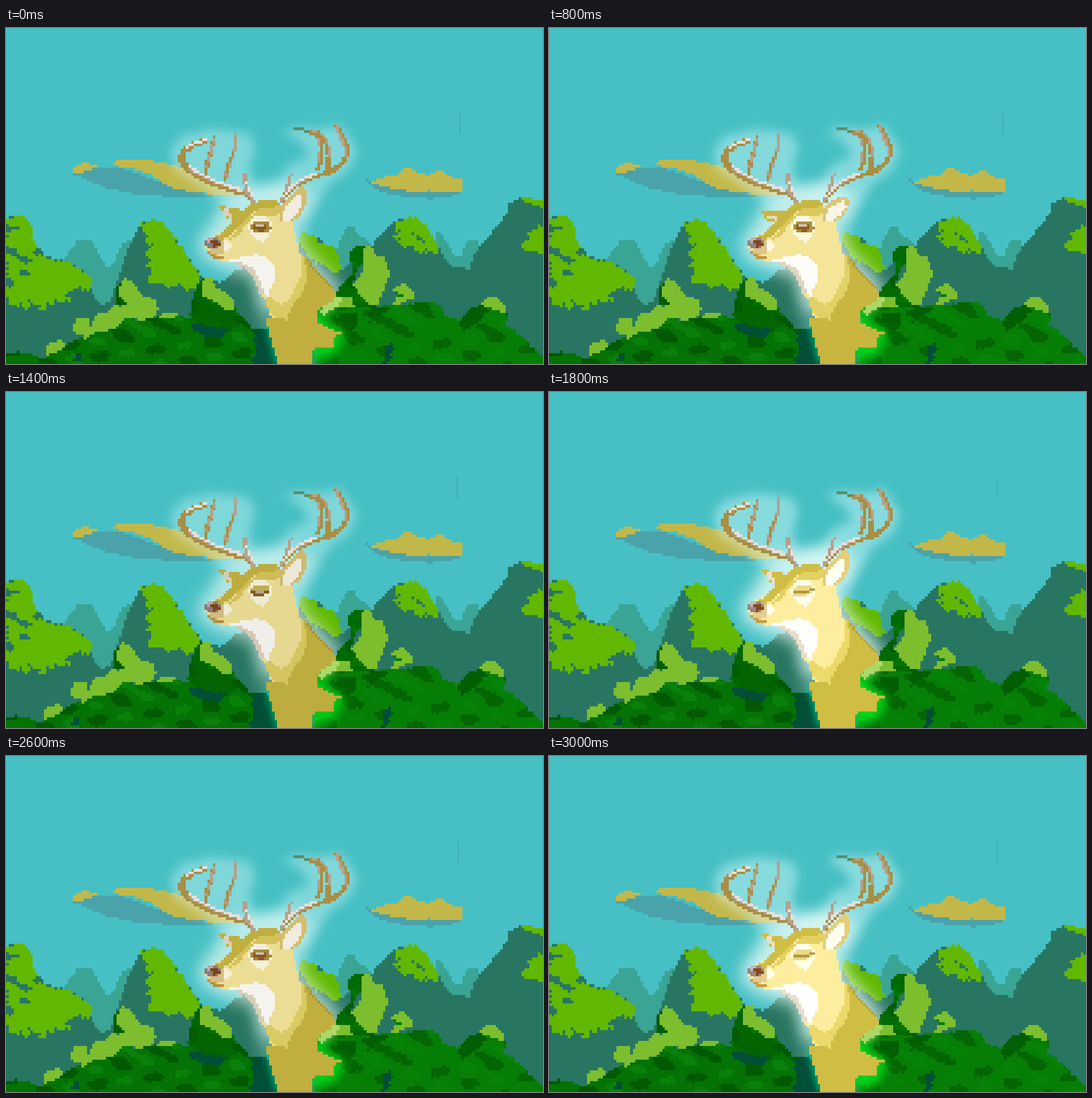
Animation of 947 by 592 pixels, one loop 3.2 s. Source, as an HTML page with a canvas:

```html
<!DOCTYPE html>
<html lang="en">
<head>
<meta charset="utf-8">
<title>Deer in the hills</title>
<style>
html, body { margin: 0; width: 100%; height: 100%; overflow: hidden; background: #46c0c4; }
canvas { display: block; }
</style>
</head>
<body>
<canvas id="stage" width="947" height="592"></canvas>
<script>
const W = 947, H = 592, CELL = 4.735;
const stage = document.getElementById('stage').getContext('2d');
const probe = document.createElement('canvas').getContext('2d');

function layer(draw) {
  const canvas = document.createElement('canvas');
  canvas.width = W + 13;
  canvas.height = H;
  draw(canvas.getContext('2d'));
  return canvas;
}

const parse = text => text.trim().split(/\s+/).map(p => p.split(',').map(Number));
const hash = (i, j) => {
  const v = Math.sin(i * 127.1 + j * 311.7) * 43758.5453;
  return v - Math.floor(v);
};

// Fills every grid cell whose centre passes the path test.
function cells(ctx, points, color, rough, pad, hit) {
  const xs = points.map(p => p[0]), ys = points.map(p => p[1]);
  const first = v => Math.floor((v - pad) / CELL), last = v => Math.ceil((v + pad) / CELL);
  for (let j = first(Math.min(...ys)); j <= last(Math.max(...ys)); j++) {
    for (let i = first(Math.min(...xs)); i <= last(Math.max(...xs)); i++) {
      const x = (i + .5) * CELL + (hash(i >> 1, j) - .5) * rough;
      const y = (j + .5) * CELL + (hash(i, j + 90) - .5) * rough;
      if (!hit(x, y)) continue;
      ctx.fillStyle = typeof color === 'function' ? color(x, y) : color;
      const left = Math.round(i * CELL), top = Math.round(j * CELL);
      ctx.fillRect(left, top, Math.round((i + 1) * CELL) - left, Math.round((j + 1) * CELL) - top);
    }
  }
}

function fill(ctx, color, text, rough = 0) {
  const points = parse(text), path = new Path2D('M' + points.join('L') + 'Z');
  cells(ctx, points, color, rough, rough, (x, y) => probe.isPointInPath(path, x, y));
}

function line(ctx, color, width, text) {
  const points = parse(text), path = new Path2D('M' + points.join('L'));
  probe.lineWidth = width;
  probe.lineJoin = 'round';
  cells(ctx, points, color, 0, width, (x, y) => probe.isPointInStroke(path, x, y));
}

function soft(ctx, color, blur, text) {
  ctx.filter = `blur(${blur}px)`;
  ctx.fillStyle = color;
  ctx.fill(new Path2D('M' + parse(text).join('L') + 'Z'));
  ctx.filter = 'none';
}

const GOLD = '#c0af3f', CREAM = '#eadc93', LEAF = '#7cbe2e', LIME = '#62b800', HILL = '#287662';
const DARK = '#025c02', FAR = '#3aa495', CLOUD = '#c2b84a', SHADE = '#4aa3aa', DEEP = '#004f36';

// Mottled foliage: diagonal dabs between three greens.
const foliage = (base, dark, light) => (x, y) => {
  const v = Math.sin(x / 13 + 2 * Math.sin(y / 15)) + Math.sin(y / 8 - x / 21);
  return v > .95 ? dark : v < -1.25 ? light : base;
};

const scenery = layer(c => {
  c.fillStyle = '#46c0c4';
  c.fillRect(0, 0, W + 13, H);
  fill(c, SHADE, '110,255 125,256 150,247 205,247 240,260 275,273 330,287 372,295 340,300 310,299 220,291 180,283 150,272 130,262');
  fill(c, CLOUD, '116,252 125,243 137,238 160,241 158,246 145,250 125,258');
  fill(c, CLOUD, '185,241 200,231 245,230 270,237 300,241 330,258 380,278 418,290 400,294 350,291 300,284 275,272 255,258 235,250 210,246');
  fill(c, SHADE, '635,265 650,272 670,278 700,286 805,288 800,294 750,301 710,299 670,291 645,280');
  fill(c, CLOUD, '643,272 660,264 690,260 700,248 712,245 722,252 735,256 745,262 758,251 770,250 778,262 800,264 806,272 803,289 765,290 745,286 720,289 690,284 665,279');
  fill(c, FAR, '100,412 118,385 128,373 150,373 160,388 168,408 181,424 192,410 203,382 225,372 240,500 120,500');
  fill(c, FAR, '583,390 597,360 603,352 613,352 622,364 640,374 660,420 580,430');
  fill(c, FAR, '755,355 770,365 782,385 790,403 802,405 810,382 822,372 835,378 840,430 770,430');
  fill(c, HILL, '0,335 20,330 35,345 50,380 70,402 110,412 140,430 150,462 165,488 185,482 200,435 215,388 238,345 255,338 275,345 300,375 320,403 340,430 350,445 380,448 408,426 440,415 510,420 520,365 550,370 582,400 590,430 605,415 645,385 658,365 690,338 715,333 737,345 755,372 775,408 787,423 818,424 828,395 850,368 885,325 888,308 908,300 960,308 960,592 0,592');
  fill(c, LIME, '0,333 10,335 15,329 30,333 42,350 55,385 50,402 70,405 110,412 120,425 140,430 150,442 148,462 122,458 105,468 112,480 90,483 75,488 65,503 57,490 42,482 35,498 25,488 8,487 0,465', 7);
  fill(c, HILL, '0,343 10,352 20,351 16,359 0,358', 5);
  fill(c, HILL, '0,380 15,388 28,402 48,408 34,415 20,405 0,394', 6);
  fill(c, HILL, '22,428 42,430 38,438 25,436', 5);
  fill(c, HILL, '0,440 15,447 8,458 0,455', 5);
  fill(c, LIME, '236,345 250,338 275,342 300,375 320,403 340,430 338,458 318,462 310,450 290,456 275,450 262,453 247,448 257,425 245,418 260,410 243,395 262,382 243,376 250,362 237,355', 7);
  fill(c, LIME, '515,372 520,360 545,367 550,378 578,383 585,400 590,425 580,435 565,425 560,415 545,415 540,405 525,390', 6);
  fill(c, LIME, '683,352 700,335 720,333 742,345 750,370 765,382 757,400 740,385 735,402 715,385 700,388 695,372 683,372 695,360', 7);
  fill(c, HILL, '715,360 730,365 740,378 728,374', 4);
  fill(c, LIME, '905,303 915,298 932,301 960,308 960,322 935,313');
  fill(c, LIME, '903,385 925,372 915,362 932,358 940,348 960,343 960,410 930,392 915,392', 6);
});

const leftBush = layer(c => {
  const bush = foliage('#047204', '#015a02', '#0a800a');
  fill(c, bush, '-5,575 20,570 45,574 65,584 75,592 -5,592');
  fill(c, DARK, '193,458 205,443 222,465 222,488 194,490');
  fill(c, bush, '68,580 100,562 130,547 165,533 205,515 250,510 300,507 325,513 325,490 340,470 342,445 350,438 370,470 402,490 425,515 432,530 455,530 475,535 480,592 68,592', 3);
  fill(c, foliage('#026502', DARK, '#047204'), '341,445 350,437 355,470 380,482 402,495 412,522 395,535 340,522 325,505 330,475');
  fill(c, DEEP, '323,516 345,522 365,528 392,530 388,541 360,545 332,536', 5);
  fill(c, DEEP, '435,535 455,530 485,535 490,592 430,592 440,565', 5);
  fill(c, DEEP, '122,575 133,570 131,587 122,592', 4);
  fill(c, LEAF, '200,458 210,440 228,452 236,469 262,478 268,495 262,508 238,516 215,508 190,505 187,495 215,487 200,472');
  fill(c, LEAF, '150,522 160,505 180,500 190,489 215,492 218,510 202,518 190,531 160,536 136,549 138,540');
  fill(c, LEAF, '117,525 125,512 145,510 148,525 138,540 122,538');
  fill(c, LEAF, '70,564 80,553 100,550 105,562 85,573 72,576');
  fill(c, LEAF, '270,509 280,500 302,501 300,510');
  fill(c, LEAF, '347,448 355,436 365,445 370,458 390,468 402,480 400,496 385,495 370,482 347,472');
});

const rightBush = layer(c => {
  fill(c, foliage('#026a02', DARK, '#047404'), '604,402 614,385 638,384 636,410 620,425 612,450 640,488 650,500 555,530 550,500 565,484 582,470 590,455 608,438 613,420');
  fill(c, LEAF, '632,390 640,380 648,388 650,398 668,405 672,420 678,432 670,450 660,475 655,490 640,488 625,470 612,453 625,440 632,412');
  fill(c, foliage('#067e06', '#036603', '#068206'), '550,600 555,515 565,503 610,492 680,488 740,483 765,488 775,507 800,515 815,495 835,487 860,493 885,502 883,525 905,540 925,560 947,580 960,592', 3);
  fill(c, '#025e02', '575,515 600,498 620,505 625,525 600,540 590,530', 5);
  fill(c, '#025e02', '642,490 660,488 675,495 655,510 640,520', 5);
  fill(c, '#025e02', '800,520 815,495 838,486 852,500 830,518 808,535', 4);
  fill(c, DEEP, '668,562 682,555 682,575 670,592 664,592', 4);
  fill(c, LEAF, '683,488 690,472 683,460 692,453 705,450 722,467 718,478 705,480 690,490');
  fill(c, '#067e06', '685,464 708,474 690,472');
  fill(c, LEAF, '838,487 850,472 865,475 883,490 882,502 862,498');
});

const halo = layer(c => {
  soft(c, 'rgba(225,255,255,.43)', 9, '290,215 310,190 365,178 425,185 440,205 430,250 440,280 480,275 500,240 535,228 520,200 490,185 510,175 560,178 590,170 620,215 605,250 570,275 545,320 525,350 500,310 440,310 380,308 335,275 295,250');
  soft(c, 'rgba(240,255,250,.75)', 14, '385,300 425,285 500,270 540,295 520,345 525,385 560,420 592,460 575,490 450,500 435,440 385,425 345,405 338,375 362,345');
  soft(c, 'rgba(200,255,250,.28)', 12, '440,440 500,430 530,520 530,592 455,592');
});

const greenGlow = layer(c => {
  soft(c, 'rgba(0,230,30,.85)', 9, '548,490 570,490 560,505 570,525 597,535 590,560 575,582 535,590 530,520');
  soft(c, 'rgba(0,190,135,.75)', 6, '455,520 490,520 500,592 474,592');
  soft(c, 'rgba(215,255,170,.5)', 4, '553,500 560,488 582,476 594,480 580,494 560,505');
});

const midLeaf = layer(c => {
  fill(c, LEAF, '555,502 560,490 575,483 580,472 610,474 615,492 580,493 570,499 560,507');
  fill(c, '#a9da68', '555,502 560,490 575,483 580,474 592,473 588,491 570,497 560,507');
});

const body = layer(c => {
  fill(c, CREAM, '432,308 480,306 505,340 510,365 517,395 527,408 540,425 520,460 500,510 470,515 455,475 447,470 440,445 428,428 410,414 385,411 368,407 356,398 351,382 357,370 385,358 410,328');
  fill(c, '#d9c962', '519,398 535,420 540,440 520,480 505,516 480,518 462,495 457,472 468,474 484,488 500,478 513,452 522,432');
  fill(c, GOLD, '525,400 545,425 570,450 584,472 575,483 558,488 551,500 550,518 575,532 591,537 577,546 577,561 542,566 537,592 480,592 470,560 463,530 457,500 460,510 495,514 505,490 522,470 532,438');
  fill(c, '#ab9835', '522,393 527,402 545,423 568,448 580,462 560,445 536,420');
  fill(c, GOLD, '432,309 445,305 478,305 484,315 455,317 438,322 428,335 412,350 396,366 380,374 365,370 385,358 400,342 415,323');
  fill(c, '#d2c15b', '450,317 483,314 488,328 470,330 440,329 425,345 405,370 390,375 420,340');
  fill(c, '#f4f2ec', '385,408 420,404 440,399 462,405 474,422 475,445 465,460 466,472 450,470 445,445 430,430 415,414');
  fill(c, '#d8ccb8', '400,411 425,416 440,430 448,448 455,470 447,471 440,447 428,428');
  fill(c, '#f3efd7', '430,338 440,329 455,330 468,342 470,355 462,370 455,378 440,374 432,364 427,350');
  fill(c, '#f3efd7', '380,381 388,374 398,378 397,390 386,393');
  fill(c, '#d4bd83', '376,374 385,378 382,397 370,401 357,396');
  fill(c, '#b8903a', '355,391 368,400 385,402 382,407 366,406 356,399');
  fill(c, '#8c7c7b', '351,378 358,369 370,368 378,376 372,389 356,390');
  fill(c, '#b8aaa9', '352,374 360,368 367,372 356,379');
  fill(c, '#804317', '361,376 374,375 378,382 366,387');
});

const ears = [
  layer(c => {
    fill(c, GOLD, '375,313 394,316 413,320 417,328 405,340 394,338 384,326');
    fill(c, '#d9d2b8', '379,316 393,320 400,336 391,334');
    fill(c, '#d2bd70', '482,315 497,301 512,286 520,279 528,283 528,312 520,328 505,342 485,342');
    fill(c, '#f0ebdd', '485,330 497,310 512,296 523,288 523,310 515,325 501,339 487,341');
  }),
  layer(c => {
    fill(c, GOLD, '375,322 392,320 413,322 420,328 408,343 390,341 378,334');
    fill(c, '#d9d2b8', '379,329 393,330 405,332 402,339 388,338');
    fill(c, '#d2bd70', '481,320 495,308 508,299 523,297 529,304 527,319 517,333 502,343 485,342');
    fill(c, '#f0ebdd', '485,332 495,317 508,309 522,304 524,317 514,329 501,339 487,341');
  })
];

const eyes = [
  layer(c => {
    fill(c, '#a8893a', '428,350 436,341 450,339 464,343 467,355 455,361 436,359');
    fill(c, '#8a5b1e', '432,349 440,345 457,345 461,353 453,358 437,357');
    fill(c, '#c9bfc2', '438,346 454,345 453,351 439,351');
  }),
  layer(c => {
    fill(c, '#c2ae55', '428,350 436,341 450,339 465,343 467,351 430,353');
    fill(c, '#8a5b1e', '431,351 463,349 461,355 452,360 436,358');
    fill(c, '#b8a698', '439,350 453,349 453,354 440,354');
  }),
  layer(c => {
    fill(c, '#d9c980', '428,350 437,340 452,339 466,345 465,354 450,360 433,358');
    line(c, '#a58f37', 5, '429,352 440,355 453,353 467,348');
  })
];

const antlers = layer(c => {
  const brown = '#a98e43', tan = '#b5a18b', pale = '#e6e0dc';
  const leftBeam = '432,300 424,291 400,285 370,275 340,261 318,247 309,232 313,217 330,206 354,198';
  line(c, brown, 11, leftBeam);
  line(c, tan, 6, '434,303 425,289 400,281 370,271 340,257 322,245');
  line(c, pale, 5, '415,286 395,279 370,270 342,256 324,244');
  line(c, pale, 5, '318,211 332,203 354,196');
  line(c, brown, 7, '369,188 363,210 356,235 351,258');
  line(c, tan, 4, '367,195 360,222 353,248');
  line(c, tan, 6, '404,187 403,215 396,235 389,252 387,272');
  line(c, brown, 4, '402,220 391,240 386,270');
  line(c, tan, 7, '420,255 422,272 430,290 435,307');
  line(c, pale, 3, '424,270 431,289 436,304');
  const rightBeam = '485,306 495,290 515,274 545,260 570,256 590,242 601,225 600,206 591,190 583,171';
  line(c, brown, 9, rightBeam);
  line(c, tan, 5, '583,171 589,190 597,210 598,225');
  line(c, tan, 6, '485,306 495,289 515,273 535,263');
  line(c, pale, 5, '490,297 502,281 520,268 548,256');
  line(c, brown, 8, '530,182 552,186 565,201 570,225 567,252');
  line(c, '#5d8c68', 5, '507,178 520,179 535,182');
  line(c, tan, 4, '540,181 557,186 568,202 571,225');
  line(c, brown, 8, '549,188 557,210 555,235 549,250');
  line(c, tan, 4, '550,195 554,212 552,238');
  line(c, tan, 5, '503,254 500,270 492,291');
});

const STEP = 200, STEPS = 16;
const glowLevel = [.2, .65, 1, .85, .6, .35, .1, 0, .5, 1, .8, .5, .3, .2, .6, 1];
const eyeState = [0, 0, 0, 0, 0, 0, 1, 1, 2, 2, 2, 1, 0, 0, 1, 2];
const streakX = step => step % 2 === 0 ? 800 : [797, 795, 790][eyeState[step]];

function draw(step) {
  const level = glowLevel[step], sway = step % 2;
  const put = (image, dx = 0) => stage.drawImage(image, dx, 0);
  put(scenery);
  stage.fillStyle = 'rgba(40,115,115,.45)';
  stage.fillRect(streakX(step), 150, 1, 38);
  stage.globalAlpha = .84 + .16 * level;
  put(halo);
  stage.globalAlpha = 1;
  put(leftBush, -4 * sway);
  put(rightBush, -3 * sway);
  put(midLeaf, -4 * sway);
  stage.globalAlpha = .85 + .15 * level;
  put(greenGlow);
  stage.globalAlpha = 1;
  stage.filter = `brightness(${.985 + .1 * level})`;
  put(body);
  put(ears[step >= 1 && step <= 4 ? 1 : 0]);
  put(eyes[eyeState[step]]);
  stage.filter = 'none';
  put(midLeaf, -4 * sway);
  put(antlers);
}

let shown = -1;
function tick() {
  const step = Math.floor(performance.now() / STEP) % STEPS;
  if (step !== shown) draw(shown = step);
  requestAnimationFrame(tick);
}
tick();
</script>
</body>
</html>
```
